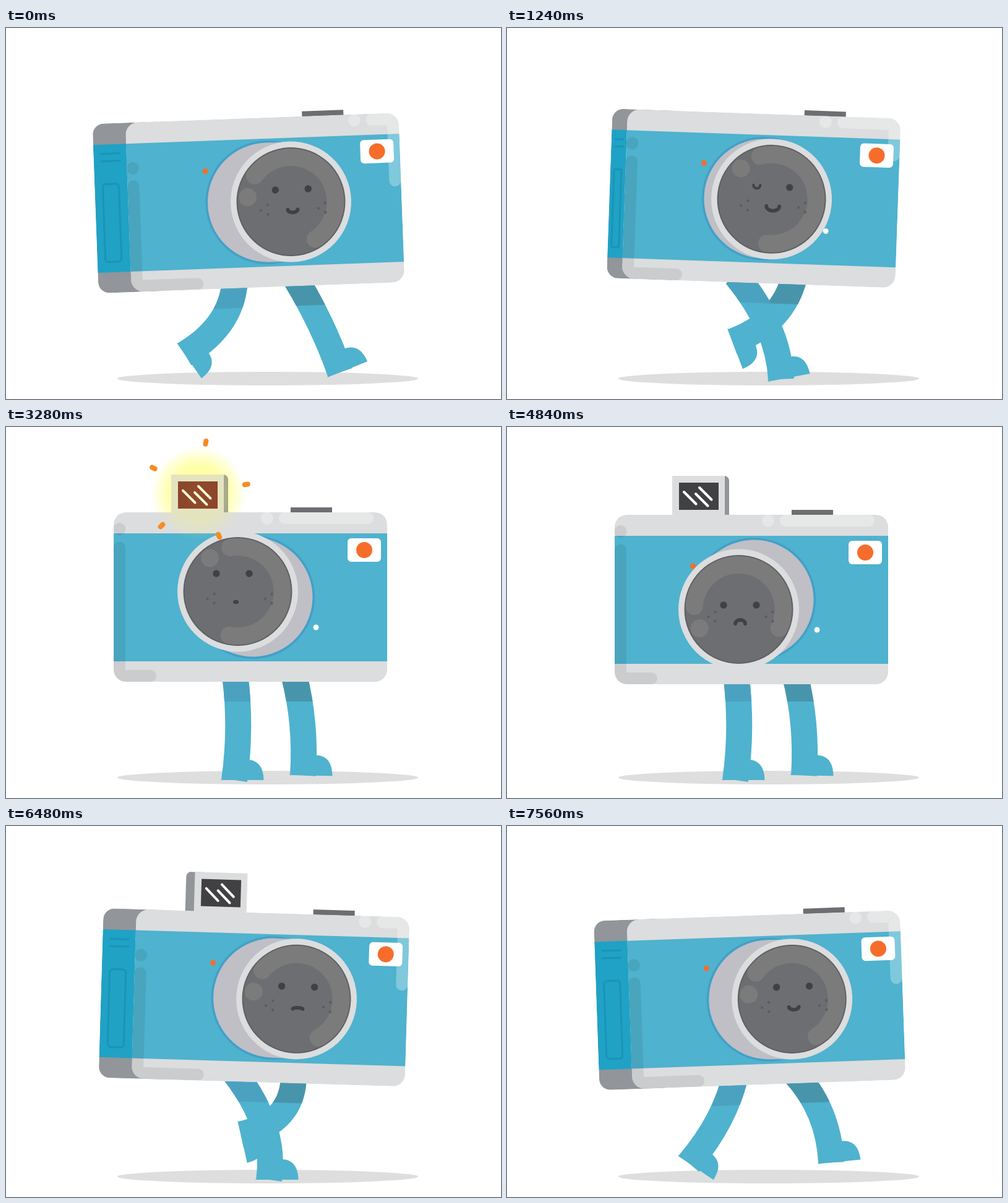
An HTML page with a canvas that plays this animation: 800x600 px, repeating every 7600 ms.

```html
<!DOCTYPE html>
<html lang="en">
<head>
<meta charset="utf-8">
<title>Walking camera</title>
<style>
  html, body { margin: 0; width: 800px; height: 600px; overflow: hidden; background: #fff; }
  canvas { display: block; }
</style>
</head>
<body>
<canvas id="stage" width="800" height="600"></canvas>
<script>
const c = document.getElementById('stage').getContext('2d');
const LOOP = 7600, CYCLE = 800, STOP = 3040, GO = 5840;
const RAD = Math.PI / 180, TAU = 2 * Math.PI;
const BLUE = '#4fb2ce', LIGHT = '#dcddde', GREY = '#929599', DARK = '#414042';

const mix = (a, b, k) => a + (b - a) * k;

// Smooth rise from 0 to 1 while t goes from a to b
function rise(t, a, b) {
  const k = Math.min(1, Math.max(0, (t - a) / (b - a)));
  return k * k * (3 - 2 * k);
}
const pulse = (t, a, b, c, d) => rise(t, a, b) - rise(t, c, d);

function state(t) {
  const glance = pulse(t, 560, 1040, 1520, 1880);
  const facing = pulse(t, 2480, 3060, 5380, 5840);
  const up = pulse(t, 2480, 3060, 3800, 4400);
  const down = pulse(t, 3800, 4400, 5300, 5780);
  const grump = pulse(t, 3800, 4400, 7000, 7400);
  const walk = 1 - pulse(t, 2840, 3180, 5600, 5860);
  const phase = (Math.min(t, STOP) + Math.max(0, t - GO)) / CYCLE;
  const swing = Math.cos(TAU * phase);
  const turn = 1 - .406 * glance - facing;
  const side = Math.max(0, (turn - .25) / .75);
  const sag = 4 * pulse(t, 4100, 4600, 5300, 5700);
  return {
    walk, phase, turn, side, sag,
    tilt: -2.1 * RAD * swing * walk,
    x: 395 + 28.5 * side ** 1.2,
    y: 275 + sag - 5 * glance + 7 * walk * swing ** 4,
    lensX: 4 + mix(-24.5, 38, turn),
    lensY: .5 - 9.5 * up + 15.5 * down,
    shine: 35 * glance + 42 * up - 34 * down,
    eyeX: 2 - 10 * up,
    eyeY: -20 - 9 * up + 13 * down,
    wink: t > 1080 && t < 1440,
    mouthX: 2.5 - 5.5 * up,
    mouthY: 15 + 2 * up + 5 * down,
    mouthW: 8 + 2.5 * glance - 6.5 * up,
    smile: 9 + 6 * glance - 9 * up - 13 * grump - 8 * down,
    pop: pulse(t, 2760, 2960, 7080, 7400) - .03 * up,
    glow: pulse(t, 3040, 3140, 3300, 3500),
    burst: rise(t, 3060, 3190),
    fade: rise(t, 3300, 3440),
  };
}

// Heel position and sole angle; the cycle starts as the heel strikes the ground
function stride(phase) {
  const q = phase % 1;
  const s = Math.max(0, (q - .4) / .6);
  const lift = Math.sin(Math.PI * s ** .8);
  const toeUp = q < .1 ? 1 - q / .1 : rise(q, .62, .82);
  return [Math.max(276, 440 - 365 * Math.min(q, 1 - q)), 572 - 91 * lift, 80 * lift - 22 * toeUp];
}

function fill(color, draw) {
  c.fillStyle = color;
  c.beginPath();
  draw();
  c.fill();
}
const disc = (x, y, r, color) => fill(color, () => c.arc(x, y, r, 0, TAU));
const box = (x, y, w, h, color, r = 0) => fill(color, () => c.roundRect(x, y, w, h, r));

function stroke(width, color, draw, cap = 'round') {
  c.strokeStyle = color;
  c.lineWidth = width;
  c.lineCap = cap;
  c.beginPath();
  draw();
  c.stroke();
}
const line = (points, width, color, cap) =>
  stroke(width, color, () => points.forEach(p => c.lineTo(...p)), cap);

function clipped(draw, shape) {
  c.save();
  c.beginPath();
  shape();
  c.clip();
  draw();
  c.restore();
}

// Front-face space: the origin is the centre of the face, which tilts about its base
function inBody(v, draw) {
  c.save();
  c.translate(v.x, v.y + 137);
  c.rotate(v.tilt);
  c.translate(0, -137);
  draw();
  c.restore();
}

function leg(hipX, knee, [x, y, angle], color) {
  const a = angle * RAD, cos = Math.cos(a), sin = Math.sin(a);
  const ax = x + 22 * cos, ay = y + 22 * sin;
  stroke(42, color, () => {
    c.moveTo(hipX, 400);
    c.quadraticCurveTo(ax + 85 * sin + knee, ay - 85 * cos, ax, ay);
  }, 'butt');
  c.save();
  c.translate(x, y);
  c.rotate(a);
  fill(color, () => {
    c.moveTo(0, 0);
    c.lineTo(69.5, 0);
    c.bezierCurveTo(69, -20, 61, -33, 42, -33);
    c.lineTo(22, -33);
  });
  c.restore();
}

function legs(v) {
  const pose = (rest, [x, y, angle], dx, dy) =>
    [x + dx, y + dy, angle].map((p, i) => mix(rest[i], p, v.walk));
  const near = pose([347, 571, 0], stride(v.phase + .5), 0, 0);
  const far = pose([458, 563, 1], stride(v.phase), 80, -7);
  const both = (nearColor, farColor) => {
    leg(465, 4, far, farColor);
    leg(370, 12, near, nearColor);
  };
  both(BLUE, BLUE);
  clipped(() => both('#4ba2c0', '#4895ab'),
    () => inBody(v, () => c.rect(-320, 60, 640, 109 - v.sag)));
}

function bands(x, w, grey, blue) {
  box(x, -137, w, 274, grey);
  box(x, -103, w, 207, blue);
}

function side(s) {
  if (s < .01) return;
  const left = -221 - 53 * s, ink = '#1b93b7';
  const x = k => left + k * s;
  clipped(() => {
    bands(left, 120, GREY, '#1fa2c5');
    for (const y of [-88, -76]) line([[x(11), y], [x(43), y]], 3, ink, 'butt');
    stroke(3, ink, () => c.roundRect(x(13), -39, 26 * s, 126, 5 * s));
  }, () => c.roundRect(left, -137, 120, 274, 18));
}

function front(v) {
  const u = v.turn;
  clipped(() => {
    bands(-221, 442, LIGHT, BLUE);
    box(157, -95, 54, 38, '#fff', 6);
    disc(184, -76, 13, '#f66d2b');

    const shade = 'rgba(0,0,0,.08)', gloss = 'rgba(255,255,255,.28)', edge = 211.5;
    disc(-edge, -110 + 47 * u, 10, shade);
    line([[-edge, -80 + 46 * u], [-edge, 127.5], [-161.5 + 48 * u, 127.5]], 19, shade);

    // The gloss slides along the top edge and around the corner
    const start = 55.5 + 122 * u, end = start + 134;
    disc(27 + 122 * u, -127.5, 10, gloss);
    const path = [[start, -127.5], [Math.min(end, edge), -127.5]];
    if (end > edge) path.push([edge, -127.5 + end - edge]);
    line(path, 19, gloss);
  }, () => c.roundRect(-221, -137, 442, 274, 20));
  disc(-94.5, -54, 4.5, '#f66d2b');
  disc(106, 49, 4.5, '#fff');
}

function face(v) {
  for (const x of [-38, 55]) {
    disc(x - 11, 12, 2.2, '#5c5d60');
    disc(x, 4, 2.2, '#5c5d60');
    disc(x, 19, 2.2, '#5c5d60');
  }
  const left = v.eyeX - 26.5, right = v.eyeX + 26.5;
  disc(right, v.eyeY, 5.7, DARK);
  if (v.wink) stroke(4, DARK, () => c.arc(left, v.eyeY - 2, 5.5, 0, Math.PI));
  else disc(left, v.eyeY, 5.7, DARK);
  const turned = v.smile < 0 ? Math.PI : 0;
  stroke(5.8, DARK, () => c.ellipse(v.mouthX, v.mouthY - v.smile / 4,
    v.mouthW, Math.abs(v.smile) / 2, 0, turned, turned + Math.PI));
}

function lens(v) {
  disc(4, 0, 100, '#41a0c8');
  line([[4, 0], [v.lensX, v.lensY]], 193, '#c0bfc5');
  c.save();
  c.translate(v.lensX, v.lensY);
  disc(0, 0, 97.5, LIGHT);
  disc(0, 0, 88, '#5f6064');
  disc(0, 0, 86, '#6d6e71');
  c.save();
  c.rotate(v.shine * RAD);
  stroke(28, '#7b7b7b', () => c.arc(0, 0, 72, 218 * RAD, 419 * RAD));
  disc(-69.5, -10, 14.5, '#7b7b7b');
  c.restore();
  face(v);
  c.restore();
}

function halo(alpha) {
  const g = c.createRadialGradient(-84, -167, 0, -84, -167, 76);
  const tone = a => `rgba(255,255,80,${a})`;
  g.addColorStop(0, tone(alpha));
  g.addColorStop(.6, tone(alpha * .85));
  g.addColorStop(1, tone(0));
  disc(-84, -167, 76, g);
}

function flash(v) {
  if (v.pop <= 0) return;
  halo(v.glow * .4);
  c.save();
  c.translate(0, 63 * (1 - v.pop));
  const depth = mix(-7, 14, v.turn);
  if (depth > 0) box(-128 - depth, -200, depth + 20, 90, GREY, [8, 0, 0, 0]);
  else box(-63, -200, 20 - depth, 90, GREY, [0, 8, 0, 0]);
  box(-128, -200, 85, 90, LIGHT);
  box(-117, -189, 64, 44, DARK);
  box(-117, -189, 64, 44, `rgba(119,4,24,${.8 * v.glow})`);
  for (const [x, y] of [[-109, -174], [-90, -171], [-84, -181]])
    line([[x, y], [x + 19.5, y + 19.5]], 4, '#fff');
  c.restore();
}

function rays(v) {
  if (!v.burst || v.fade === 1) return;
  const r = mix(45, 80, v.burst), half = 2.5 * (1 - v.fade);
  for (let i = 0; i < 5; i++) {
    const a = (72 * i - 80) * RAD;
    const p = d => [-86 + d * Math.cos(a), -171 + d * Math.sin(a)];
    line([p(r - half), p(r + half)], 3.2 * half, '#f68b23');
  }
}

function frame() {
  const v = state(performance.now() % LOOP);
  c.clearRect(0, 0, 800, 600);
  fill('#dedede', () => c.ellipse(423, 567, 243, 11, 0, 0, TAU));
  legs(v);
  inBody(v, () => {
    flash(v);
    box(65, -145, 67, 12, '#6d6e71');
    side(v.side);
    front(v);
    lens(v);
    halo(v.glow * .25);
    rays(v);
  });
  requestAnimationFrame(frame);
}
frame();
</script>
</body>
</html>
```
